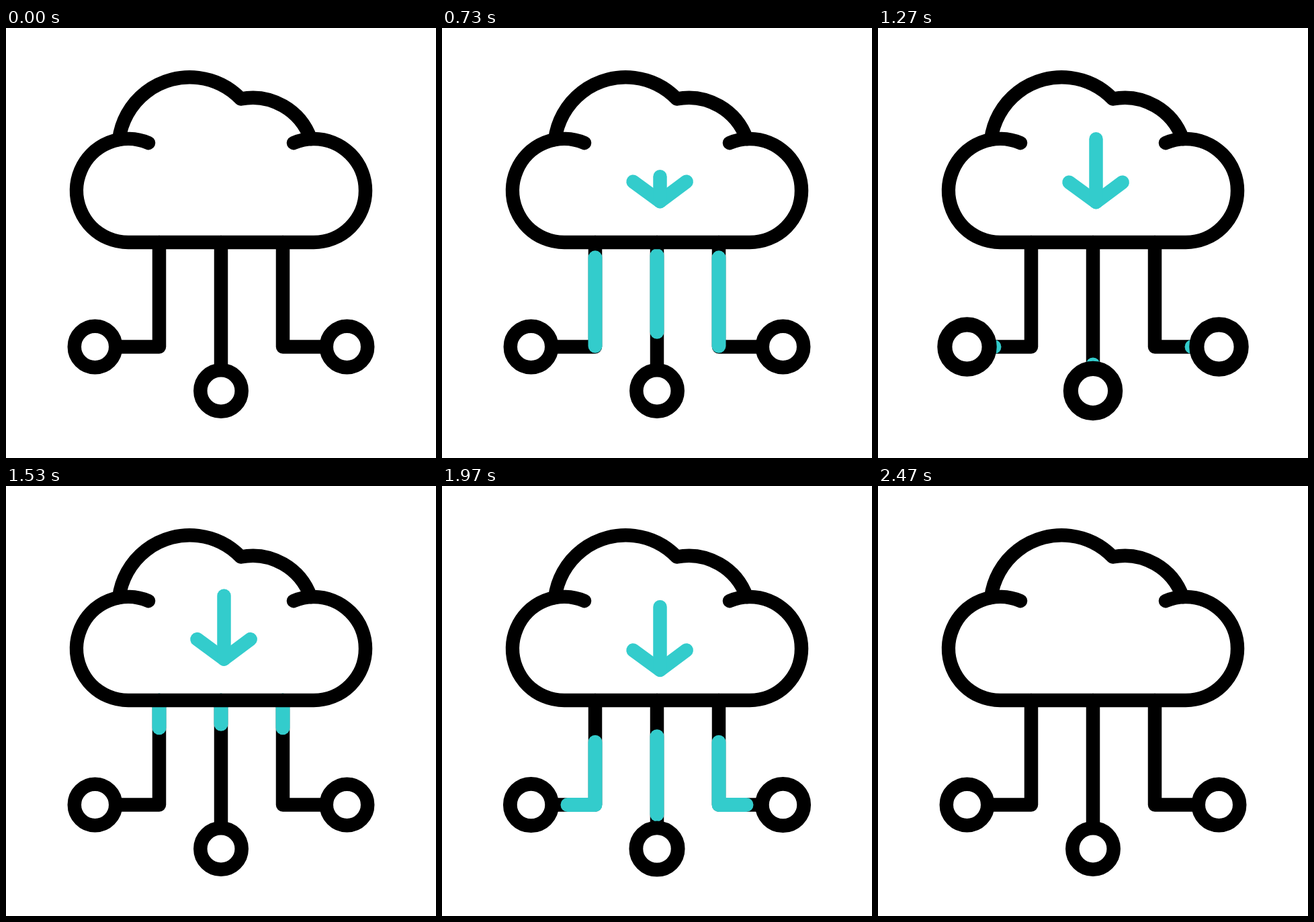
Animation, 640 px wide and 640 px high, one loop 2.5 s. Source, as an HTML page with a canvas:

```html
<!DOCTYPE html>
<html lang="en">
<head>
<meta charset="utf-8">
<title>Cloud download</title>
<style>
  html, body { margin: 0; width: 100%; height: 100%; overflow: hidden; background: #fff; }
  canvas { display: block; width: 100vw; height: 100vh; object-fit: contain; }
</style>
</head>
<body>
<canvas id="stage" width="640" height="640"></canvas>
<script>
const ctx = document.getElementById('stage').getContext('2d');
const LOOP = 2500, BLACK = '#000', CYAN = '#33cccc', WEIGHT = 20.5;

const LINES = [
  [[228, 319], [228, 474.5], [163, 474.5]],
  [[320, 319], [320, 509.5]],
  [[412, 319], [412, 474.5], [477, 474.5]]
];
const NODES = [[132.5, 474.5], [320, 540], [507.5, 474.5]];

// Arrow strokes relative to the height of the barbs
const HEAD = [[284.5, 0], [324.5, 29.3], [363.7, 0]];
const SHAFT = [[324.5, 29.3], [324.5, -64.5]];
const REST_Y = 244.5;

// All timings below are in ticks of 1/30 s
const WAVES = [
  { head: 9.2, headDur: 18.3, tail: 20.05, tailDur: 18.8 },
  { head: 42.6, headDur: 18.4, tail: 53.7, tailDur: 18.8 }
];
const PULSES = [[25, 34.6, 41.4], [57.2, 66.8, 73.2]];
const DRAW = [9.2, 18.2], ERASE = [60, 14], LAND = 27.65;

const clamp = v => Math.max(0, Math.min(1, v));
const ramp = (t, start, dur) => clamp((t - start) / dur);
const smooth = v => v * v * (3 - 2 * v);
const dist = (a, b) => Math.hypot(b[0] - a[0], b[1] - a[1]);
const length = pts => pts.slice(1).reduce((sum, p, i) => sum + dist(pts[i], p), 0);

function stroke(color, width = WEIGHT) {
  ctx.strokeStyle = color;
  ctx.lineWidth = width;
  ctx.stroke();
}

// Strokes the part of a polyline between two fractions of its length
function trim(pts, from, to, color, width) {
  if (to <= from) return;
  const total = length(pts), a = from * total, b = to * total;
  let pos = 0;
  ctx.beginPath();
  for (let i = 1; i < pts.length; i++) {
    const p = pts[i - 1], q = pts[i], len = dist(p, q);
    const u = clamp((a - pos) / len), v = clamp((b - pos) / len);
    if (v > u) {
      const at = k => [p[0] + (q[0] - p[0]) * k, p[1] + (q[1] - p[1]) * k];
      ctx.lineTo(...at(u));
      ctx.lineTo(...at(v));
    }
    pos += len;
  }
  stroke(color, width);
}

function drawCloud() {
  const ang = (cx, cy, x, y) => Math.atan2(y - cy, x - cx);
  ctx.beginPath();
  ctx.arc(273.3, 179.3, 106, ang(273.3, 179.3, 168, 166), ang(273.3, 179.3, 349.5, 105.3));
  ctx.arc(367, 195.3, 91.5, ang(367, 195.3, 349.5, 105.3), ang(367, 195.3, 453.5, 165));
  stroke(BLACK);
  ctx.beginPath();
  ctx.arc(182, 242, 77, ang(182, 242, 212, 171.3), Math.PI / 2, true);
  ctx.arc(458, 242, 77, Math.PI / 2, ang(458, 242, 428, 171.3), true);
  stroke(BLACK);
}

function nodeScale(t) {
  return PULSES.reduce((s, [start, peak, end]) => {
    const up = smooth(ramp(t, start, peak - start));
    const down = smooth(ramp(t, peak, end - peak));
    return s + 0.16 * (up - down);
  }, 1);
}

// Slides down, then three decaying bounces
function arrowY(t) {
  if (t < LAND) return 193 + (REST_Y - 193) * ramp(t, DRAW[0], LAND - DRAW[0]);
  let start = LAND, dur = 11.05, height = 62.5;
  for (let i = 0; i < 3; i++) {
    const u = (t - start) / dur;
    if (u < 1) return REST_Y - 4 * height * u * (1 - u);
    start += dur;
    dur *= 0.76;
    height *= 0.577;
  }
  return REST_Y;
}

function drawArrow(t) {
  const head = length(HEAD), shaft = length(SHAFT);
  const shown = (head + shaft) * (ramp(t, ...DRAW) - ramp(t, ...ERASE));
  ctx.save();
  ctx.translate(0, arrowY(t));
  trim(HEAD, 0, clamp(shown / head), CYAN);
  trim(SHAFT, 0, clamp((shown - head) / shaft), CYAN);
  ctx.restore();
}

function draw(t) {
  ctx.fillStyle = '#fff';
  ctx.fillRect(0, 0, 640, 640);
  ctx.lineCap = ctx.lineJoin = 'round';

  for (const line of LINES) trim(line, 0, 1, BLACK);
  for (const w of WAVES) {
    const from = ramp(t, w.tail, w.tailDur), to = ramp(t, w.head, w.headDur);
    for (const line of LINES) trim(line, from, to, CYAN, 21);
  }

  const s = nodeScale(t);
  for (const [x, y] of NODES) {
    ctx.beginPath();
    ctx.arc(x, y, 30.7 * s, 0, Math.PI * 2);
    ctx.fill();
    stroke(BLACK, WEIGHT * s);
  }

  drawCloud();
  drawArrow(t);
}

const begin = performance.now();
function tick() {
  const ms = (performance.now() - begin) % LOOP;
  draw(Math.floor(ms * 0.03 + 0.15) % 75);
  requestAnimationFrame(tick);
}
tick();
</script>
</body>
</html>
```
